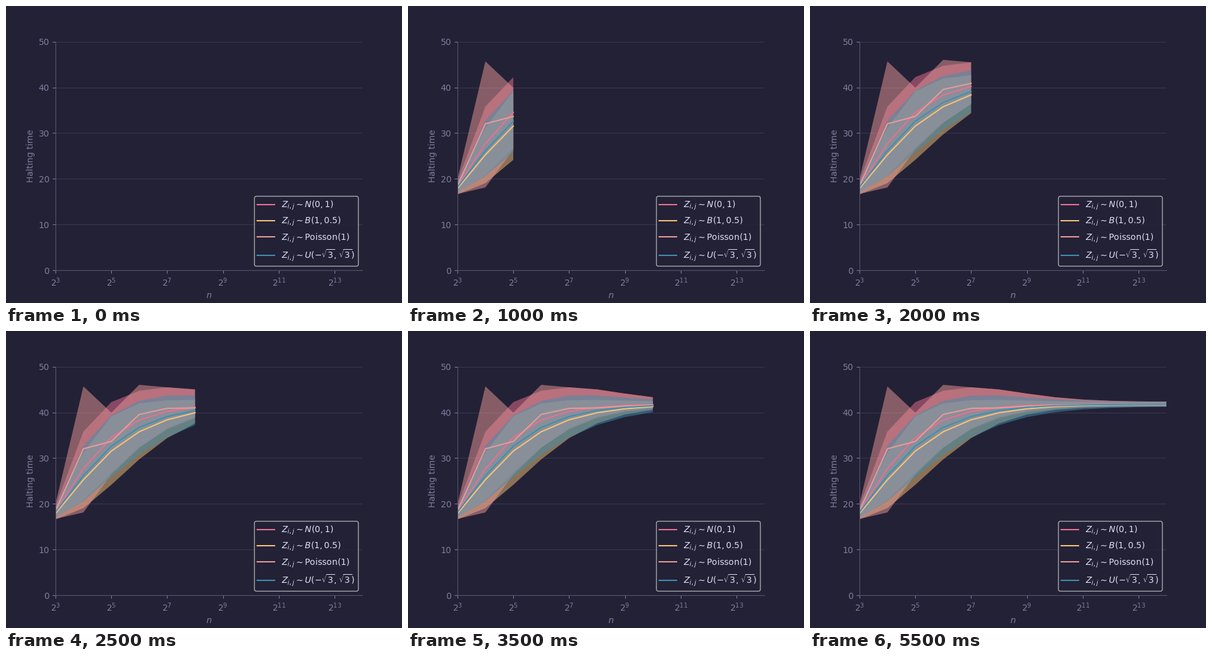
Animation, 640 px wide and 480 px high, one loop 8 s. Source, as a matplotlib script:

```python
import matplotlib.pyplot as plt
import numpy as np
from matplotlib.animation import FuncAnimation
from matplotlib.ticker import NullLocator

BASE, TEXT = "#232136", "#e0def4"
SUBTLE, SPINE, GRID = "#817c9c", "#59546d", "#393552"
STEP_MS, FRAMES = 500, 16

steps = np.arange(12)
sizes = 2.0 ** (steps + 3)


def rise(start, limit, scale, power):
    """Stretched-exponential approach from start to limit."""
    return limit + (start - limit) * np.exp(-(steps / scale) ** power)


def low(start, scale, power):
    return rise(start, 41.3, scale, power)


def mid(start, scale, power=1.2):
    return rise(start, 41.8, scale, power)


def high(start, scale, power, overshoot):
    bump = (steps / 4 * np.exp(1 - steps / 4)) ** 6
    return rise(start, 42.3, scale, power) + overshoot * bump


def kink(*offsets):
    """Sampling scatter of the first steps after the start."""
    return np.pad(offsets, (1, len(steps) - 1 - len(offsets)))


# label, colour, lower edge, middle, upper edge
SERIES = [
    (r"$Z_{i,j} \sim N(0, 1)$", "#eb6f92",
     low(16.9, 3.0, 1.6), mid(18.3, 1.75), high(19.5, 0.845, 1.3, 3.2)),
    (r"$Z_{i,j} \sim B(1, 0.5)$", "#f6c177",
     low(16.6, 3.5, 1.8), mid(17.9, 2.3), high(19.0, 1.24, 1.4, 0.5)),
    (r"$Z_{i,j} \sim \mathrm{Poisson}(1)$", "#ea9a97",
     low(16.7, 3.0, 1.7) + kink(-2.1),
     mid(18.5, 1.5, 1.0) + kink(2.2, -2.0, 0.9, 0.7),
     high(20.0, 0.85, 1.3, 3.2) + kink(9.8, -2.3, 1.3)),
    (r"$Z_{i,j} \sim U(-\sqrt{3}, \sqrt{3})$", "#3e8fb0",
     low(17.0, 3.4, 1.5), mid(18.2, 2.1), high(19.3, 1.13, 1.1, 1.8)),
]

plt.rcParams.update({
    "font.family": "DejaVu Sans",
    "axes.axisbelow": True,
    "axes.spines.top": False,
    "axes.spines.right": False,
    "axes.facecolor": BASE,
    "axes.edgecolor": SPINE,
    "axes.labelcolor": SUBTLE,
    "xtick.color": SUBTLE,
    "ytick.color": SUBTLE,
    "text.color": TEXT,
    "grid.color": GRID,
})

fig, ax = plt.subplots(figsize=(6.4, 4.8), dpi=100, facecolor=BASE)
ax.set_xscale("log", base=2)
ax.set_xlim(sizes[0], sizes[-1])
ax.set_ylim(0, 50)
ax.set_xticks(sizes[::2])
ax.xaxis.set_minor_locator(NullLocator())
ax.grid(axis="y")
ax.set_xlabel("$n$")
ax.set_ylabel("Halting time")

curves = []
for label, color, lower, middle, upper in SERIES:
    band, = ax.fill([sizes[0]] * 2, [lower[0], upper[0]],
                    facecolor=color, alpha=0.5, lw=0)
    line, = ax.plot([], [], color=color, label=label)
    curves.append((band, line, lower, middle, upper))
ax.legend(loc="lower right")


def update(frame):
    n = min(frame + 1, len(sizes))
    x = sizes[:n]
    for band, line, lower, middle, upper in curves:
        band.set_xy(np.column_stack([np.r_[x, x[::-1]],
                                     np.r_[lower[:n], upper[:n][::-1]]]))
        line.set_data(x, middle[:n])
    return [artist for curve in curves for artist in curve[:2]]


anim = FuncAnimation(fig, update, frames=FRAMES, interval=STEP_MS,
                     repeat=True, repeat_delay=0)
plt.show()
```
